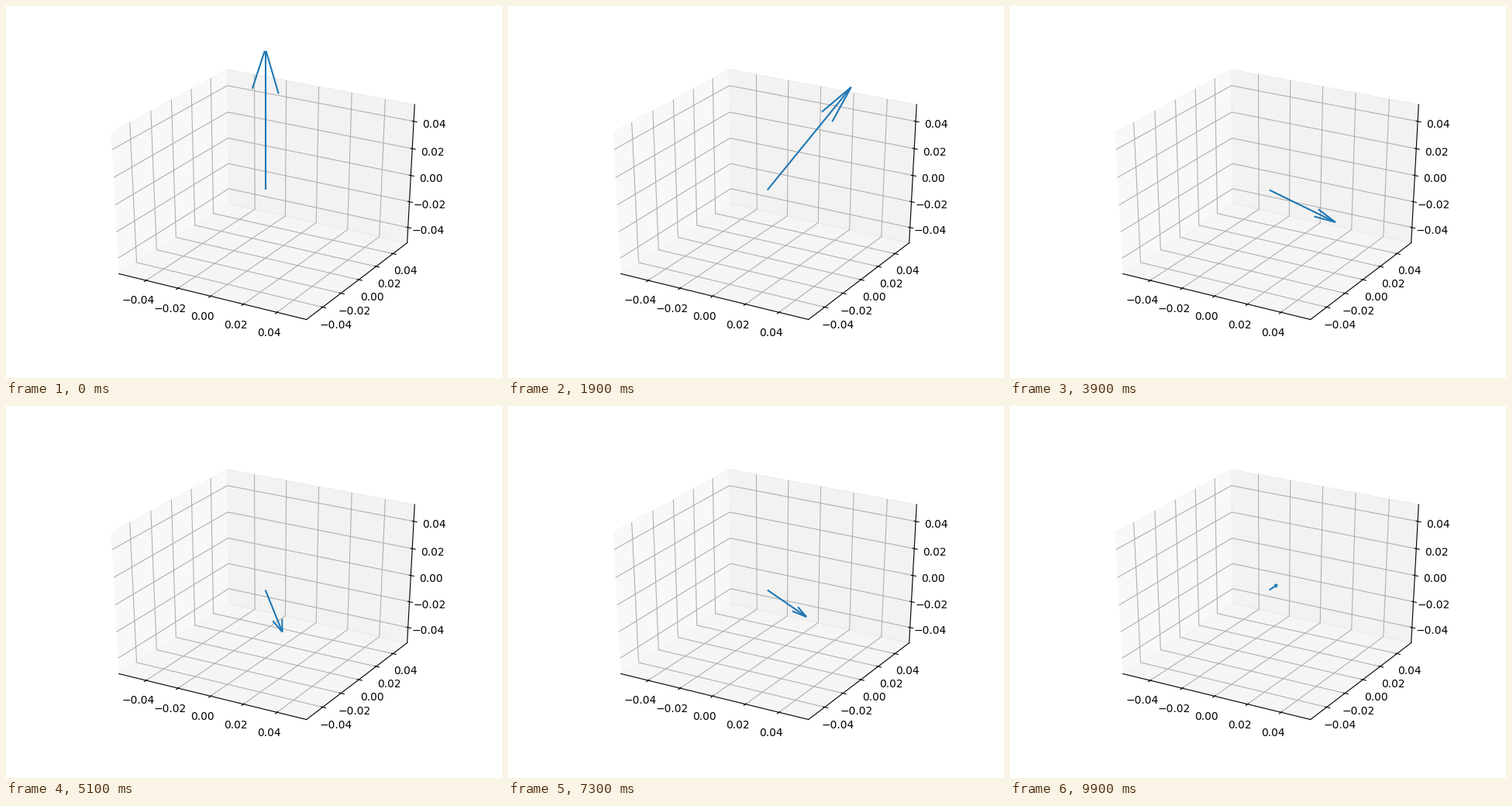
Animation of 640x480 px, one loop 10 s. Source, as a matplotlib script:

```python
import numpy as np
import matplotlib.pyplot as plt
from matplotlib.animation import FuncAnimation

FRAMES, INTERVAL = 100, 100
M0 = 0.1                    # initial magnetization, along z
LARMOR = 2 * np.pi * 0.16   # precession, rad per frame
RABI = 0.0603               # nutation, rad per frame
T2 = 25                     # transverse decay, frames


def magnetization(t):
    """Damped nutation in the rotating frame, turned back to the lab frame."""
    k = 0.5 / T2
    w = np.sqrt(RABI**2 - k**2)
    decay = M0 * np.exp(-k * t)
    v = decay * RABI / w * np.sin(w * t)
    z = decay * (np.cos(w * t) + k / w * np.sin(w * t))
    return v * np.sin(LARMOR * t), v * np.cos(LARMOR * t), z


fig = plt.figure(figsize=(6.4, 4.8), dpi=100)
ax = fig.add_subplot(projection="3d")

# Let the unit cube fill the whole wide subplot instead of a square.
ax.apply_aspect = lambda position=None: None
ax.set_box_aspect((1, 1, 1), zoom=np.sqrt(3) / 1.8294640721620434)

pad = 25 / 24
ax.set_xlim(-0.055 * pad, 0.055 * pad)
ax.set_ylim(-0.055 * pad, 0.055 * pad)
ax.set_zlim(-0.05 * pad, 0.05 * pad)

arrow = None


def update(i):
    global arrow
    if arrow is not None:
        arrow.remove()
    arrow = ax.quiver(0, 0, 0, *magnetization(i))
    return (arrow,)


anim = FuncAnimation(fig, update, frames=FRAMES, interval=INTERVAL,
                     init_func=lambda: update(0), repeat=True, repeat_delay=0)
plt.show()
```
